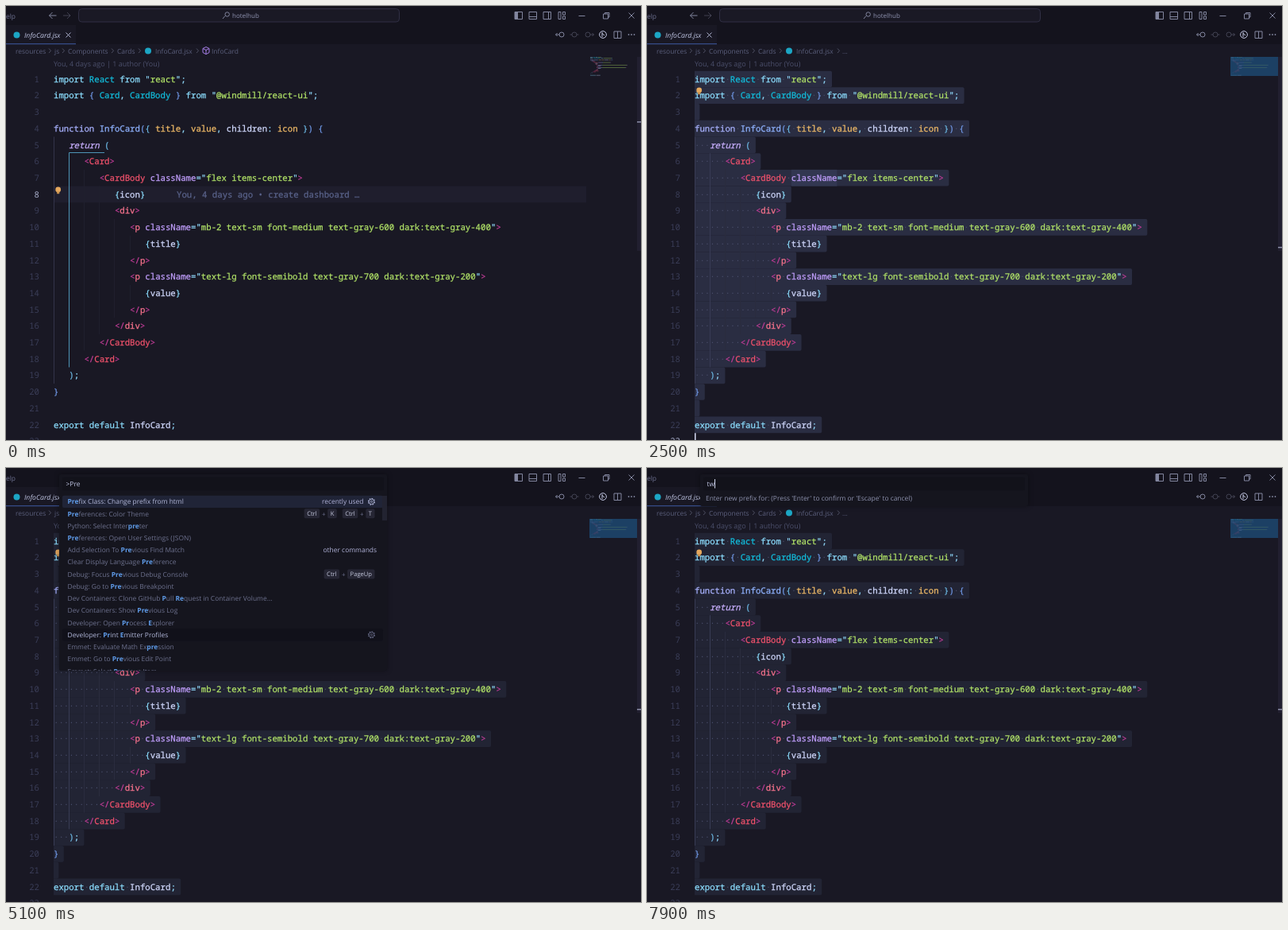
Animation, 800 px wide and 546 px high, one loop 8 s. Source, as an HTML page:

```html
<!DOCTYPE html>
<html lang="en">
<head>
<meta charset="utf-8">
<title>Editor</title>
<style>
  html, body { margin: 0; width: 100%; height: 100%; overflow: hidden; background: #191824; }
  svg { display: block; }
  text { font: 8.45px "Open Sans", "Noto Sans", sans-serif; white-space: pre; text-rendering: geometricPrecision; fill: #6d7190; }
  .mono { font: 10.68px "Noto Sans Mono", "DejaVu Sans Mono", monospace; }
  .code { fill: currentColor; stroke: currentColor; stroke-width: .25; }
  .num { fill: #3a3d57; text-anchor: end; }
  .num.on { fill: #a9aecb; }
  .line { fill: none; stroke: #82869f; stroke-width: 1; }
  .dim { opacity: .4; }
  .picked { display: none; }
  .sel .picked { display: inline; }
  .range { fill: #2a2d42; }
  .blur .range { fill: #222434; }
  .word { fill: #323751; }
  .blur .word { display: none; }
  .dots { fill: #4a4f6c; }
  .guide { stroke: #1f1f2d; }
  .guide.strong { stroke: #33344a; }
  .sel .guide { stroke: #2a2c3e; }
  .sel .guide.strong { stroke: #383b54; }
  .mini { opacity: .75; }
  .sel .mini { opacity: .3; }
  .caret { fill: #d5daf2; }
  .hit { fill: #5f9be8; font-weight: 700; }
  .row { fill: #6d718e; }
  .row.bright { fill: #b2b8da; }
  .panel { fill: #15151e; filter: drop-shadow(0 0 3px rgba(0, 0, 0, .36)); }
</style>
</head>
<body>
<svg id="stage" width="800" height="546" viewBox="0 0 800 546"></svg>
<script>
const NS = 'http://www.w3.org/2000/svg';
const stage = document.getElementById('stage');
const CW = 6.408, LH = 20.71, LEFT = 60;
const midY = n => 92 + (n - 1) * LH;
const topY = n => midY(n) - LH / 2;

function add(parent, tag, attrs = {}, text) {
  const node = document.createElementNS(NS, tag);
  for (const k in attrs) node.setAttribute(k, attrs[k]);
  if (text !== undefined) node.textContent = text;
  return parent.appendChild(node);
}
const group = (parent, cls = '') => add(parent, 'g', { class: cls });
const rect = (p, x, y, width, height, fill, more) =>
  add(p, 'rect', { x, y, width, height, ...(fill && { fill }), ...more });
const label = (p, x, y, text, more) => add(p, 'text', { x, y, ...more }, text);
const stroke = (p, d, more) => add(p, 'path', { d, class: 'line', ...more });
const show = (node, on) => { node.style.display = on ? 'inline' : 'none'; };

// Token classes: each "~x" switches the colour until the next one.
const INK = {
  k: '#8cdeff', c: '#12bedd', q: '#92dcff', s: '#b2e468', f: '#a9b2ff', n: '#8fb2ff',
  b: '#7098e6', e: '#6cb9e4', o: '#f2bc68', w: '#d2daff', i: '#c9b0ff',
  t: '#c53d9a', g: '#f2526c', h: '#fb748e', a: '#c3a0ff'
};
const SOURCE = [
  '~kimport ~cReact ~kfrom ~q"~sreact~q";',
  '~kimport ~b{ ~cCard~q, ~cCardBody ~b} ~kfrom ~q"~s@windmill/react-ui~q";',
  '',
  '~ffunction ~nInfoCard~b(~e{ ~otitle~q, ~ovalue~q, ~wchildren~q: ~oicon ~e}~b) {',
  '~i   return ~e(',
  '~t      <~gCard~t>',
  '~t         <~gCardBody ~aclassName~q="~sflex items-center~q"~t>',
  '~k            {~wicon~k}',
  '~t            <~hdiv~t>',
  '~t               <~hp ~aclassName~q="~smb-2 text-sm font-medium text-gray-600 dark:text-gray-400~q"~t>',
  '~k                  {~wtitle~k}',
  '~t               </~hp~t>',
  '~t               <~hp ~aclassName~q="~stext-lg font-semibold text-gray-700 dark:text-gray-200~q"~t>',
  '~k                  {~wvalue~k}',
  '~t               </~hp~t>',
  '~t            </~hdiv~t>',
  '~t         </~gCardBody~t>',
  '~t      </~gCard~t>',
  '~e   )~q;',
  '~b}',
  '',
  '~kexport default ~wInfoCard~q;',
  ''
];

// Editor
const BAND_END = 731;
const band = rect(stage, LEFT, 0, 0, LH, '#1f1e2d');
const ranges = group(stage, 'picked');
const guides = group(stage);
const code = group(stage);
const nums = [];
rect(stage, 735, 64, 60, 24, '#1c4064', { class: 'picked' });
const mini = group(stage, 'mini');

[[0, 5, 19], [3, 6, 18], [6, 7, 17], [9, 8, 16], [12, 10, 15], [15, 11, 11], [15, 14, 14]].forEach(([col, from, to], i) => {
  const x = Math.floor(LEFT + col * CW) + .5;
  add(guides, 'path', { d: `M${x} ${topY(from)}V${topY(to + 1)}`, class: i < 2 ? 'guide strong' : 'guide' });
});
const scope = stroke(guides, `M124 184.5H79.5V${topY(19)}`, { style: 'stroke:#4d94b6' });

SOURCE.forEach((src, i) => {
  const n = i + 1, y = midY(n) + 3.7;
  let plain = '';
  for (const part of src.split('~').slice(1)) {
    const ink = INK[part[0]], body = part.slice(1), text = body.trimStart();
    const col = plain.length + body.length - text.length;
    label(code, LEFT + col * CW, y, text, {
      class: 'mono code', style: `color:${ink};${text.startsWith('return') ? 'font-style:italic' : ''}`
    });
    rect(mini, 736 + col * .535, 64.3 + i * 1.07, text.trimEnd().length * .535, .8, ink, { opacity: .6 });
    plain += body;
  }
  nums.push(label(stage, 42, y, n, { class: 'mono num' }));
  if (n === SOURCE.length) return;
  const w = (plain.length + 1) * CW - 2;
  add(ranges, 'path', {
    class: 'range',
    d: `M${LEFT} ${topY(n)}h${w}q2 0 2 2v${LH - 4}q0 2-2 2H${LEFT}z`
  });
  const dots = [...plain].map(ch => ch === ' ' ? '·' : ' ').join('');
  label(ranges, LEFT, y, dots, { class: 'mono dots' });
});
rect(ranges, LEFT + 19 * CW, topY(7), 9 * CW, LH, '', { class: 'word' });

label(stage, 60, 76, 'You, 4 days ago | 1 author (You)', { style: 'font-size:9px;fill:#4b4f6b' });
const blame = label(stage, 215, midY(8) + 3.7, 'You, 4 days ago • create dashboard …', { class: 'mono code', style: 'color:#5a638b' });
const caret = rect(stage, 0, 0, 1.5, LH, '', { class: 'caret' });
const bulb = group(stage);
add(bulb, 'circle', { r: 3.4, fill: '#e5a85e' });
rect(bulb, -1.6, 2.5, 3.2, 2.8, '#c8924f', { rx: .6 });

rect(stage, 795, 64, 5, 244, '#211f30');
const mark = rect(stage, 795, 0, 5, 1.5, '#8c8ea8');

// Title bar and tabs
rect(stage, 0, 0, 800, 48, '#14131d');
rect(stage, 0, 24, 88, 24, '#191824');
rect(stage, 0, 47.2, 88, 1, '#3d59a1');
label(stage, 0, 15.5, 'elp');

const center = group(stage);
stroke(center, 'M54.5 12H63.5M58.5 8L54.5 12L58.5 16');
stroke(center, 'M72 12H81M77 8L81 12L77 16', { opacity: .4 });
rect(center, 91.5, 3.5, 404, 16.5, '#1a1925', { rx: 4, stroke: '#302f44' });
stroke(center, 'M273 16L276 12.5M276 10.5a2.7 2.7 0 1 1 5.4 0a2.7 2.7 0 1 1-5.4 0');
label(center, 285, 15, 'hotelhub', { style: 'font-size:8px;fill:#8f93b0' });

['M644.5 7.5v9', 'M659 13.5h9.5', 'M683.5 7.5v9'].forEach((d, i) =>
  stroke(stage, `M${641 + i * 18} 7.5h9.5v9h-9.5z${d}`));
rect(stage, 641, 8, 3.5, 8.5, '#82869f');
stroke(stage, 'M696 7.5h3v9h-3zM701.5 7.5h3v3.5h-3zM701.5 13h3v3.5h-3z');
stroke(stage, 'M721.5 12.5h8M752.5 10h6v6h-6zM754.5 10V8.5h5.5V14H758.5M784.5 8.5l7 7M791.5 8.5l-7 7');

const ring = (x, y, r) => `M${x - r} ${y}a${r} ${r} 0 1 1 ${2 * r} 0a${r} ${r} 0 1 1 ${-2 * r} 0`;
stroke(stage, ring(700, 36, 3) + 'M697 36H692.5M694.5 34l-2 2l2 2');
stroke(stage, ring(716, 36, 3) + 'M710.5 36h2.5M719 36h2.5' + ring(733, 36, 3) + 'M736 36h4.5M738.5 34l2 2l-2 2', { class: 'line dim' });
stroke(stage, ring(752, 36, 4.4) + 'M751 33v6M751 34.5l3 2.5', { style: 'stroke:#c2c7e2' });
stroke(stage, 'M766 32h9v8.5h-9zM770.5 32v8.5');
[784.5, 788, 791.5].forEach(cx => add(stage, 'circle', { cx, cy: 36, r: .9, fill: '#82869f' }));

const dot = (cx, cy) => add(stage, 'circle', { cx, cy, r: 4, fill: '#1ca6c4' });
dot(13.5, 36.5);
label(stage, 23, 39.5, 'InfoCard.jsx', { style: 'font-size:8.7px;font-style:italic;fill:#c0c6e4' });
stroke(stage, 'M75.5 33.5l6 6M81.5 33.5l-6 6', { style: 'stroke:#b0b5d2' });

// Breadcrumb
const crumb = (p, x, text) => label(p, x, 59.5, text, { style: 'fill:#5a5e7b' });
[[12, 'resources'], [61, 'js'], [78, 'Components'], [140, 'Cards'], [188, 'InfoCard.jsx']].forEach(([x, s]) => crumb(stage, x, s));
[54, 71, 133, 167, 240].forEach(x => stroke(stage, `M${x} 53.5l2.5 2.8l-2.5 2.8`, { opacity: .5 }));
dot(179, 56.5);
const symbol = group(stage);
stroke(symbol, 'M252 51.5l4 2v5l-4 2.2l-4-2.2v-5zM248 53.5l4 2l4-2M252 55.5v5', { style: 'stroke:#a77fe8' });
crumb(symbol, 259, 'InfoCard');
const more = crumb(stage, 246, '...');

// Command palette
const RECENT = `Prefix Class: Change prefix from html
Preferences: Color Theme|Ctrl+K Ctrl+T
Terminal: Select Default Profile
Terminal: Configure Terminal Settings
TypeScript: Restart TS Server
Flutter: New Project
Editor Font Zoom In
Editor Font Zoom Out
View: Reset Zoom|Ctrl+NumPad0
View: Zoom Out|Ctrl+-
TailwindShades: Generate custom color palette|Ctrl+K Ctrl+G
Tasks: Show Running Tasks
Developer: Toggle Keyboard Shortcuts Troubleshooting
Python: Select Interpreter
Developer: Toggle Developer Tools`;
const MATCHES = `*Pre*fix Class: Change prefix from html
*Pre*ferences: Color Theme|Ctrl+K Ctrl+T
Python: Select Inter*pre*ter
*Pre*ferences: Open User Settings (JSON)
Add Selection To *Pre*vious Find Match|#
Clear Display Language *Pre*ference
Debug: Focus *Pre*vious Debug Console|Ctrl+PageUp
Debug: Go to *Pre*vious Breakpoint
Dev Containers: Clone GitHub *P*ull *Re*quest in Container Volume...
Dev Containers: Show *Pre*vious Log
Developer: Open *Pr*ocess *E*xplorer
Developer: *Pr*int *E*mitter Profiles
Emmet: Evaluate Math Ex*pre*ssion
Emmet: Go to *Pre*vious Edit Point
Emmet: Select *Pre*vious Item`;
const FINAL = `*Prefix* Class: Change prefix from html
*Prefix* Class: Change prefix from string|#`;

function gear(p, y, color) {
  const g = add(p, 'g', { style: `--c:${color}` });
  stroke(g, ring(460.5, y, 3.9), { style: 'stroke:var(--c);stroke-width:1.2;stroke-dasharray:1.6 1.46' });
  stroke(g, ring(460.5, y, 3.2) + ring(460.5, y, 1.1), { style: 'stroke:var(--c);stroke-width:.8' });
}

// Key chips are laid out from the right edge leftwards.
function keys(p, spec, y) {
  let right = 464.5;
  for (const chord of spec.split(' ').reverse()) {
    chord.split('+').reverse().forEach((key, i) => {
      if (i) { label(p, right - 7.2, y + 3, '+', { style: 'font-size:8px' }); right -= 10; }
      const box = rect(p, 0, y - 6.3, 0, 12, '#262634', { rx: 2 });
      const cap = label(p, 0, y + 2.8, key, { style: 'font-size:7.6px;fill:#c3c7dc' });
      const w = cap.getComputedTextLength() + 7;
      box.setAttribute('width', w);
      box.setAttribute('x', right - w);
      cap.setAttribute('x', right - w + 3.5);
      right -= w;
    });
    right -= 7;
  }
}

const palette = group(stage);
const clip = add(add(stage, 'defs'), 'clipPath', { id: 'list' });
rect(clip, 67, 8, 413, 247);
const panel = rect(palette, 67, 8, 413, 247, '', { class: 'panel', rx: 2 });
rect(palette, 71, 11.5, 405, 17, '#12121a', { rx: 2 });

function list(source) {
  const g = group(palette);
  g.setAttribute('clip-path', 'url(#list)');
  source.split('\n').forEach((item, i) => {
    const [name, extra] = item.split('|'), y = 42.3 + i * 15.23;
    const focused = i === 0, hovered = i === 11;
    if (focused) rect(g, 71, 34.7, 404, 15.2, '#202437', { rx: 2 });
    if (hovered) rect(g, 71, y - 7.6, 404, 15.2, '#11111a', { rx: 2 });
    const row = label(g, 77.5, y + 3, undefined, { class: focused || hovered ? 'row bright' : 'row' });
    name.split('*').forEach((s, j) => add(row, 'tspan', j % 2 ? { class: 'hit' } : {}, s));
    if (focused) gear(g, y, '#b2b8da');
    if (hovered) gear(g, y, '#666a86');
    const tag = focused ? 'recently used' : extra === '#' ? 'other commands' : '';
    if (tag) label(g, focused ? 450.5 : 467, y + 3, tag, { style: 'text-anchor:end;fill:#b0b2d8' });
    else if (extra) keys(g, extra, y);
  });
  if (source !== FINAL) rect(g, 474, 35, 6, 31, '#222331');
  return g;
}
const lists = [RECENT, MATCHES, FINAL].map(list);
const prompt = label(palette, 74, 41.2, "Enter new prefix for: (Press 'Enter' to confirm or 'Escape' to cancel)", { style: 'fill:#8d91ad' });
const input = label(palette, 75.5, 23.3, '', { style: 'fill:#c0c6e4' });
const inputCaret = rect(palette, 0, 14, 1, 11.5, '', { class: 'caret' });

// Time line
const LOOP = 8000, SELECT = 2050, OPEN = 2950, ENTER = 7150;
const MOVES = [[0, 8], [1150, 7], [1400, 3], [SELECT, 23]];
const TYPING = [[OPEN, '>'], [4300, '>P'], [4450, '>Pr'], [4600, '>Pre'], [5250, '>Pref'],
  [5400, '>Prefi'], [5550, '>Prefix'], [ENTER, ''], [7700, 't'], [7850, 'tw']];
const latest = (steps, t) => steps.filter(s => s[0] <= t).pop();
const blink = age => age % 1000 < 500;

function render(t) {
  const [moved, line] = latest(MOVES, t);
  const open = t >= OPEN, caretX = line === 7 ? 110 : LEFT;
  stage.setAttribute('class', (t >= SELECT ? 'sel ' : '') + (open ? 'blur' : ''));

  band.setAttribute('x', caretX);
  band.setAttribute('y', topY(line));
  band.setAttribute('width', BAND_END - caretX);
  show(band, line < 23);
  nums.forEach((n, i) => n.classList.toggle('on', i + 1 === line && !open));
  mark.setAttribute('y', 61 + line * 10.52);
  show(blame, line === 8);
  show(scope, line > 3 && line < 20);
  caret.setAttribute('x', caretX);
  caret.setAttribute('y', topY(line));
  show(caret, line !== 8 && !open && blink(t - moved));
  bulb.setAttribute('transform', `translate(65.7 ${t < 2300 ? 231 : 106})`);
  show(symbol, t < 1700);
  show(more, t >= 1700);

  show(center, !open);
  show(palette, open);
  if (!open) return;
  const [typed, text] = latest(TYPING, t);
  const view = t < 4750 ? 0 : t < 5650 ? 1 : t < ENTER ? 2 : 3;
  panel.setAttribute('height', [247, 247, 60, 40][view]);
  lists.forEach((g, i) => show(g, i === view));
  show(prompt, view === 3);
  if (input.textContent !== text) input.textContent = text;
  inputCaret.setAttribute('x', 75.5 + (text ? input.getComputedTextLength() : 0));
  show(inputCaret, blink(t - typed));
}

const start = performance.now();
function tick() {
  render((performance.now() - start) % LOOP);
  requestAnimationFrame(tick);
}
tick();
</script>
</body>
</html>
```
